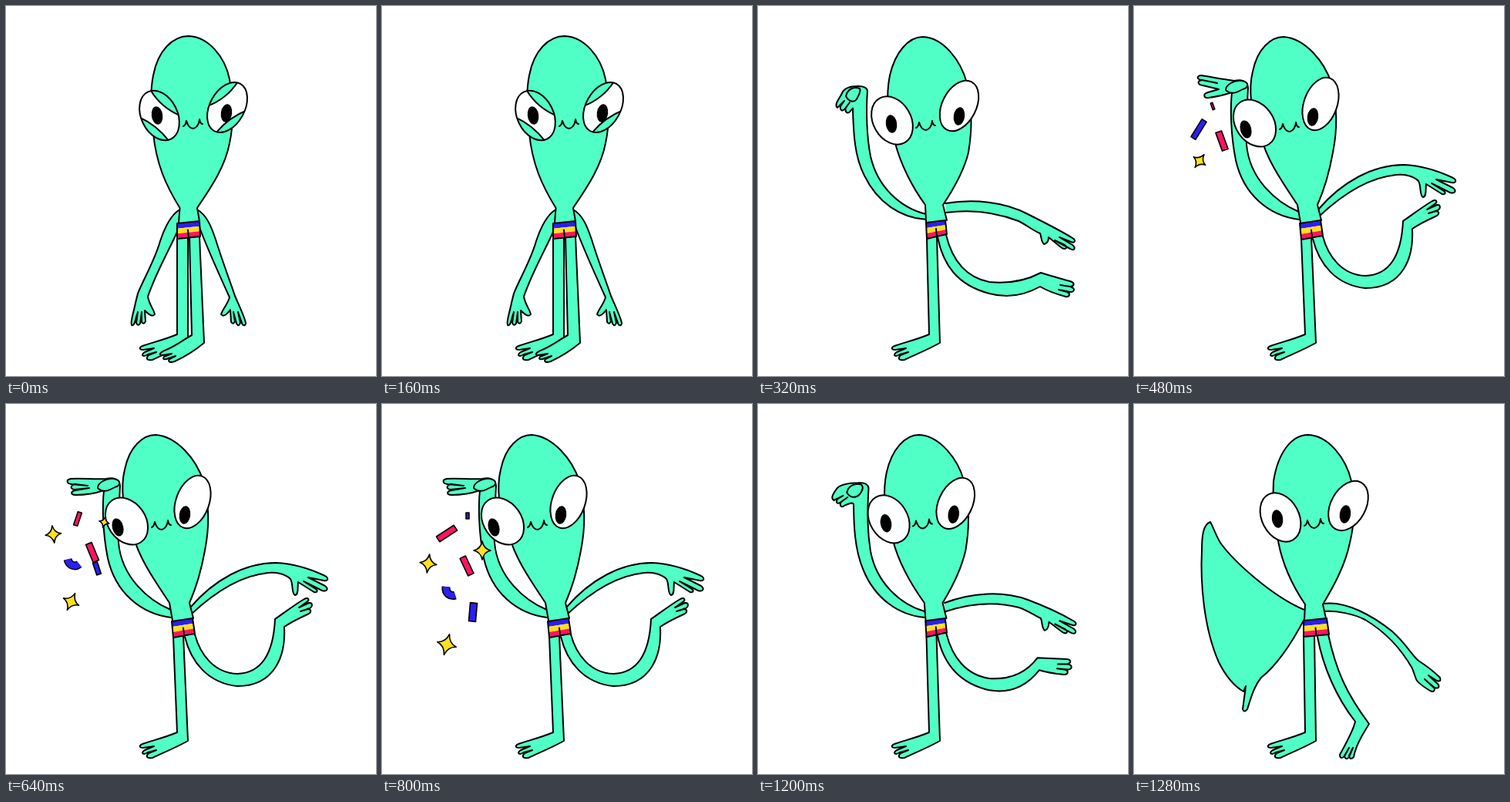
Animation, 480 px wide and 480 px high, one loop 1.36 s. Source, as an HTML page:

```html
<!DOCTYPE html>
<html lang="en">
<head>
<meta charset="utf-8">
<title>Dancing alien</title>
<style>
html, body { margin: 0; width: 100%; height: 100%; overflow: hidden; background: #fff; }
svg { display: block; width: 100vw; height: 100vh; }
path, ellipse, rect { vector-effect: non-scaling-stroke; }
</style>
</head>
<body>
<svg id="stage" viewBox="0 0 480 480" fill="#50ffc5" stroke="#000" stroke-width="2" stroke-linejoin="round" stroke-linecap="round"></svg>
<script>
const STEP = 80, LOOP = 1360;
const BLUE = '#2a20f0', YELLOW = '#ffe01e', RED = '#ff1464';
const stage = document.getElementById('stage');

// The planted leg: only the hip ends differ between poses.
const leg = (a, b) => `M${a} 302L222 426C208 432 192 436 180 440C172 442 172 446 178 446L192 444L180 449C174 453 178 456 184 452L195 449L185 453C180 458 184 460 190 459C205 452 222 445 236 437L${b} 300`;

// eye: cx, cy, rx, ry, tilt, pupil x, pupil y, pupil tilt
const stand = {
  limbs: [
    'M224 265C212 273 205 290 200 305C193 330 178 355 171 373L168 385C165 400 161 410 163 414C167 416 168 405 171 397L169 411Q171 416 174 412L176 397L176 410Q179 414 181 409L180 395C185 400 190 404 193 400C192 394 186 388 184 377C195 345 210 320 223 291',
    'M248 264C260 271 266 285 272 303C282 335 290 355 297 376C302 388 309 402 311 411C311 416 307 415 306 411L301 397L304 411Q302 417 299 412L295 397L297 409Q295 414 292 410L291 394C287 400 282 404 279 400C281 393 287 388 290 378C275 345 260 312 251 287',
    leg(222, 236),
    'M238 300L241 427C230 433 222 440 208 446C200 449 197 453 203 453L215 451L205 455C202 459 207 459 211 457L220 454L212 458C209 462 214 463 219 461C232 455 245 447 257 437L251 299'
  ],
  body: 'M224 281L225.5 262C207 232 195 205 191 165C186 135 188 105 191 90C197 58 216 39 237 39C262 40 284 65 290 95C296 130 295 155 290 178C284 210 264 238 248 262L251 279',
  shorts: [222, 282, 251, 279, 252, 299, 222, 302],
  eyes: [[199, 142, 23.5, 34, -26, 196, 142, -8], [287, 131.5, 22.5, 35, 29, 286, 139, 8]],
  mouth: [234, 149]
};

const swing = {
  limbs: [
    'M221 267C180 250 130 205 112 180C106 170 102 158 99 153C90 156 88 170 88 190C86 230 90 290 110 335C120 355 130 366 142 373L145 366L141 396Q143 401 147 396C152 380 156 366 165 355C190 335 210 300 221 279',
    'M246 259C275 255 310 275 335 295C352 310 360 325 369 333C380 340 390 348 397 355Q399 361 393 359L382 352L395 364Q397 370 390 368L377 357L390 369Q390 375 384 372C376 367 368 362 366 357L361 343C345 315 325 295 300 280C285 272 262 268 247 269',
    leg(220, 234),
    'M238 302C245 340 262 380 287 412C284 425 275 440 267 455Q267 461 272 458L279 446L273 457Q275 463 279 458L284 446L279 456Q280 463 285 458C288 442 297 428 305 415C275 375 262 345 252 299'
  ],
  body: 'M221 280L222 260C205 235 193 210 187 178C179 140 180 115 181 100C187 62 205 40 226 40C252 41 275 70 282 100C288 135 285 160 280 180C274 210 258 238 245 260L249 278',
  shorts: [220, 281, 250, 278, 253, 299, 220, 302],
  eyes: [[190, 147, 24, 33.5, -28, 186, 149, -8], [278, 132, 22.5, 34.5, 29, 274, 143, 8]],
  mouth: [225, 151]
};

const raise = {
  limbs: [
    'M218 270C185 262 155 235 146 195C141 170 140 135 142 110C141 104 134 104 130 104C120 104 112 106 109 113C106 120 98 128 103 132L112 123L107 130C106 136 110 137 113 133L119 125L114 132C112 138 117 141 120 136C122 134 124 130 123 136C124 165 125 195 138 220C155 255 185 275 218 277',
    'M114 117C116 108 124 104 132 107C134 112 130 116 128 121C125 125 118 125 114 117',
    'M243 256C280 250 320 254 350 270C372 281 392 291 408 301C413 304 411 308 406 306L391 300L408 310C413 314 410 318 405 315L385 304L398 310C403 314 398 317 393 313L377 300C377 304 375 308 371 309C367 306 368 300 366 295C358 292 348 284 338 279C310 268 280 263 244 268',
    leg(219, 232),
    'M244 297C252 330 270 352 300 358C330 361 350 355 367 346C380 350 393 354 405 357C411 359 411 363 405 364L392 362L405 364C412 366 411 371 405 371L390 368L401 371C406 373 404 378 399 377C388 374 376 370 366 364C348 374 325 380 300 373C258 362 240 335 233 300'
  ],
  body: 'M218 280L217 258C200 235 185 205 178 178C166 140 167 110 171 90C178 60 195 40 214 40C240 41 263 70 271 100C279 140 277 165 273 190C267 215 252 240 240 258L245 278',
  shorts: [218, 281, 243, 278, 245, 296, 219, 302],
  eyes: [[174, 148.5, 24.5, 33, -30, 173, 153, -8], [261, 129.5, 22, 35, 27, 261, 143, 8]],
  mouth: [209, 151]
};

const fingers = 'C115 98 98 96 84 97C78 98 78 103 85 104L106 106L90 104C84 105 82 110 89 111L108 109L90 112C84 113 83 118 90 118';
const spread = 'C115 95 100 92 87 90C81 91 81 95 88 96L108 100L88 96C82 97 82 102 89 103L110 108L96 112C89 114 90 120 97 119';
const salute = hand => ({
  limbs: [
    `M214 267C185 255 150 225 146 180C145 155 147 125 148 106C147 97 139 95 130 97${hand}C104 118 116 116 127 112C125 130 125 165 132 200C142 245 175 272 214 277`,
    'M119 109C119 102 130 96 140 97C150 99 149 106 141 108C134 112 126 116 119 109',
    'M239 264C270 228 310 206 350 206C375 207 395 214 414 223C419 226 418 230 412 229L392 225L414 236C419 240 416 244 410 242L386 230L402 240C406 243 402 246 398 243L379 231C378 238 380 247 375 248C370 246 373 234 369 227C362 220 350 218 340 219C310 222 275 240 240 273',
    leg(217, 230),
    'M245 299C252 325 270 349 300 350C332 349 347 322 349 279C362 270 375 260 387 253C393 250 394 255 390 257L380 264L393 258C398 257 398 263 394 265L382 269L392 266C397 267 396 271 391 273C380 278 370 283 361 289C363 325 350 366 300 366C262 362 240 335 232 302'
  ],
  body: 'M216 281L212 258C195 232 172 200 165 170C150 140 149 105 154 85C160 55 178 40 194 40C222 42 247 72 256 100C264 130 264 160 258 190C253 218 246 240 238 258L243 278',
  shorts: [215, 282, 242, 278, 245, 298, 217, 303],
  eyes: [[156.5, 152, 24.5, 33, -35, 145, 160, -15], [242, 127, 21.5, 35.5, 20, 232, 144, 8]],
  mouth: [193, 153]
});
const hold = salute(fingers);

const lerp = (a, b, k) => a + (b - a) * k;
function mix(a, b, k) {
  if (typeof a === 'number') return lerp(a, b, k);
  if (typeof a === 'string') {
    const to = b.match(/[\d.]+/g);
    let i = 0;
    return a.replace(/[\d.]+/g, n => lerp(+n, +to[i++], k).toFixed(1));
  }
  if (Array.isArray(a)) return a.map((v, i) => mix(v, b[i], k));
  return Object.fromEntries(Object.keys(a).map(key => [key, mix(a[key], b[key], k)]));
}

function eye([cx, cy, rx, ry, tilt, px, py, turn], i, lids) {
  const place = `transform="translate(${cx} ${cy}) rotate(${tilt}) scale(${i ? -1 : 1} 1)"`;
  const oval = attrs => `<ellipse rx="${rx}" ry="${ry}" ${attrs}/>`;
  const pupil = `<ellipse rx="7.2" ry="11.8" fill="#000" stroke="none" transform="translate(${px} ${py}) rotate(${turn})"/>`;
  if (lids === 2) return `<g ${place}>${oval('')}<path d="M0 ${-ry}Q-4 0 0 ${ry}" fill="none"/></g>`;
  const lid = lids ? `<g ${place}><clipPath id="eye${i}">${oval('')}</clipPath>
    <g clip-path="url(#eye${i})"><path d="M4 -36Q6 -8 25 13L45 -30Z"/><path d="M-25 -10Q-8 10 -3 37L-45 30Z"/></g></g>` : '';
  return `<g ${place}>${oval('fill="#fff" stroke="none"')}</g>${pupil}${lid}<g ${place}>${oval('fill="none"')}</g>`;
}

function shorts([ax, ay, bx, by, cx, cy, dx, dy]) {
  const left = k => `${lerp(ax, dx, k)} ${lerp(ay, dy, k)}`;
  const right = k => `${lerp(bx, cx, k)} ${lerp(by, cy, k)}`;
  const bands = [BLUE, YELLOW, RED].map((c, i) => {
    const k = i / 3, n = (i + 1) / 3;
    return `<path d="M${left(k)}L${right(k)}L${right(n)}L${left(n)}Z" fill="${c}" stroke="none"/>`;
  }).join('');
  const mx = (cx + dx) / 2, my = (cy + dy) / 2;
  return `${bands}<path d="M${left(0)}L${right(0)}L${right(1)}L${left(1)}ZM${mx - 1} ${my - 10}L${mx} ${my}" fill="none"/>`;
}

function figure(p, lids) {
  const [x, y] = p.mouth;
  return p.limbs.concat(p.body).map(d => `<path d="${d}"/>`).join('') + shorts(p.shorts) +
    p.eyes.map((e, i) => eye(e, i, lids)).join('') +
    `<path transform="translate(${x} ${y})" d="M-4 7Q-1 6 0 0Q3 10 9 10Q16 8 17 -2Q18 4 21 4" fill="none"/>`;
}

// Confetti keys: time, x, y, scale, angle
const strip = (w, h, c) => `<rect x="${-w / 2}" y="${-h / 2}" width="${w}" height="${h}" fill="${c}"/>`;
const star = `<path d="M0 -12Q2 -2 11 0Q2 2 0 12Q-2 2 -11 0Q-2 -2 0 -12Z" fill="${YELLOW}"/>`;
const bend = (c, w) => `<path d="M-6 -7C-7 2 0 6 6 4" fill="none" stroke="${c}" stroke-width="${w}" stroke-linecap="butt" style="vector-effect:none"/>`;
const curl = bend('#000', 11) + bend(BLUE, 8);
const confetti = [
  [strip(27, 8, RED), [480, 102, 130, .33, 70], [800, 84, 168, 1, 147], [1040, 76, 286, .35, 92]],
  [strip(25, 8, RED), [480, 114, 175, 1, 70], [800, 110, 210, 1, 65], [960, 112, 280, .4, 60]],
  [strip(27, 7, BLUE), [480, 84, 160, 1, -58], [560, 86, 184, 1, -35]],
  [curl, [640, 88, 206, 1, -20], [800, 89, 244, 1, 0], [1040, 118, 323, .3, 40]],
  [star, [480, 85, 201, .85, 35], [800, 84, 312, 1.15, 15], [960, 86, 368, .4, 0]],
  [star, [560, 62, 150, .9, -15], [800, 60, 207, 1, 8], [1040, 80, 314, .35, 20]],
  [star, [560, 126, 135, .4, 20], [800, 130, 190, 1, 0], [1040, 148, 302, .3, 20]],
  [strip(8, 4, BLUE), [720, 110, 124, .7, 70], [800, 111, 145, 1, 90], [1040, 113, 262, .9, 90]],
  [strip(24, 9, BLUE), [560, 118, 185, .5, 60], [800, 118, 270, 1, 95], [1040, 132, 371, .25, 120]]
];

function piece([shape, ...keys], t) {
  if (t < keys[0][0] || t > keys[keys.length - 1][0]) return '';
  const i = Math.max(1, keys.findIndex(key => key[0] >= t));
  const a = keys[i - 1], b = keys[i];
  const [, x, y, s, r] = mix(a, b, (t - a[0]) / (b[0] - a[0]));
  return `<g transform="translate(${x} ${y}) rotate(${r}) scale(${s})" stroke-width="1.6">${shape}</g>`;
}

const moves = [stand, stand, stand, swing, raise, mix(raise, hold, .6), salute(spread)];
const exits = { 15: mix(raise, hold, .25), 16: swing };
const blink = [1, 2, 1];

let last = -1;
function draw(now) {
  const n = Math.floor(now % LOOP / STEP);
  if (n !== last) {
    last = n;
    stage.innerHTML = figure(moves[n] || exits[n] || hold, blink[n] || 0) +
      confetti.map(c => piece(c, n * STEP)).join('');
  }
}
const start = performance.now();
function tick() {
  draw(performance.now() - start);
  requestAnimationFrame(tick);
}
tick();
</script>
</body>
</html>
```
